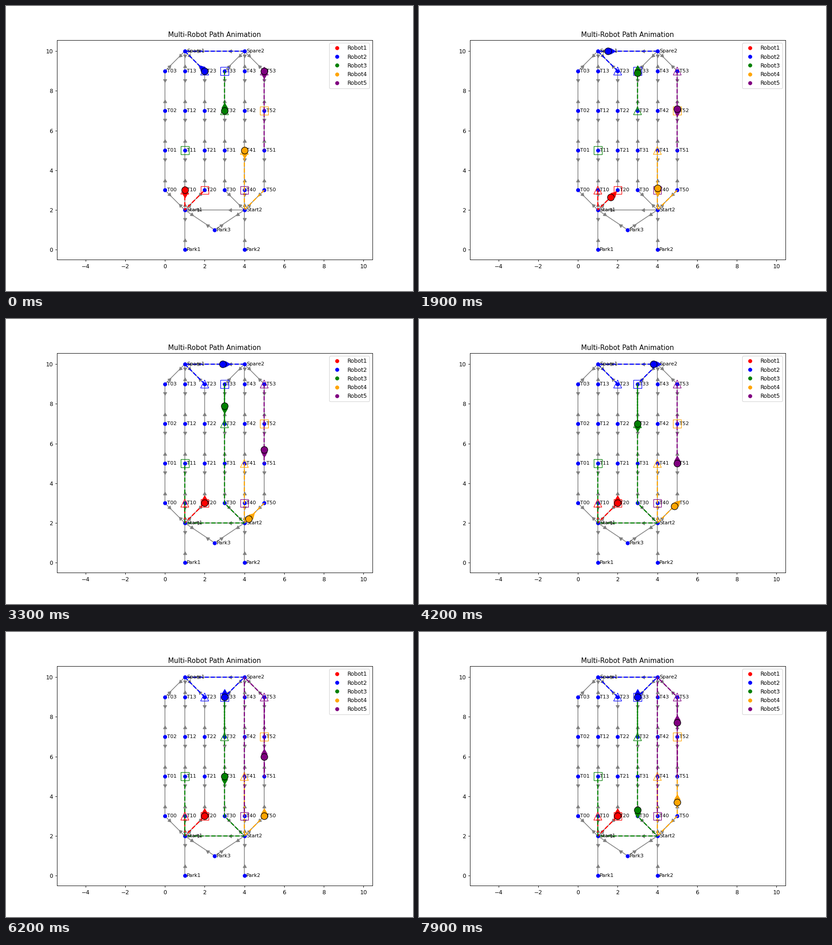
A matplotlib script for the animation above (8 s loop, 894 px wide and 626 px high).

```python
import numpy as np
import matplotlib.pyplot as plt
from matplotlib.animation import FuncAnimation

FRAMES, INTERVAL = 80, 100
DPI = 89.4
STEP = 0.1            # distance covered per frame
ARROW_GAP = 0.22      # heading arrow distance from the robot

# Track nodes: six columns with four stops each, plus junctions
nodes = {f"T{c}{r}": (c, 3 + 2 * r) for c in range(6) for r in range(4)}
nodes.update(Start1=(1, 2), Start2=(4, 2), Spare1=(1, 10), Spare2=(4, 10),
             Park1=(1, 0), Park2=(4, 0), Park3=(2.5, 1))

edges = [(f"T{c}{r}", f"T{c}{r + 1}") for c in range(6) for r in range(3)]
for c in range(6):
    side = 1 + c // 3
    edges += [(f"Start{side}", f"T{c}0"), (f"T{c}3", f"Spare{side}")]
edges += [("Start1", "Start2"), ("Spare1", "Spare2"), ("Park1", "Start1"),
          ("Park2", "Start2"), ("Park3", "Start1"), ("Park3", "Start2")]

# colour, start, goal, then (frame when planned, stops to append)
robots = [
    ("red", "T10", "T20", [(0, "Start1 T20")]),
    ("blue", "T23", "T33", [(0, "Spare1 Spare2"), (42, "T33")]),
    ("green", "T32", "T11", [(0, "T33"),
                             (22, "T32 T31 T30 Start2 Start1 T10 T11")]),
    ("orange", "T41", "T52", [(0, "T40 Start2 T50"), (72, "T51 T52")]),
    ("purple", "T53", "T40", [(0, "T52 T51"),
                              (52, "T52 T53 Spare2 T43 T42 T41 T40")]),
]


def triangle(d):
    """Triangle marker pointing along d."""
    return (3, 0, np.degrees(np.arctan2(d[1], d[0])) - 90)


def schedule(start, plans):
    """Timed legs: (planned at, departs, arrives, from, to)."""
    legs, clock, here = [], 0, np.array(nodes[start], float)
    for planned, stops in plans:
        clock = max(clock, planned)
        for stop in stops.split():
            there = np.array(nodes[stop], float)
            frames = int(round(np.hypot(*(there - here)) / STEP))
            legs.append((planned, clock, clock + frames, here, there))
            clock, here = clock + frames, there
    return legs


def pose(legs, t):
    """Position and unit heading; a waiting robot faces up."""
    pos = legs[0][3]
    for _, t0, t1, a, b in legs:
        if t0 <= t <= t1:
            d = b - a
            return a + d * (t - t0) / (t1 - t0), d / np.hypot(*d)
        if t > t1:
            pos = b
    return pos, np.array([0.0, 1.0])


fig, ax = plt.subplots(figsize=(894 / DPI, 626 / DPI), dpi=DPI)
ax.set_title("Multi-Robot Path Animation")

for a, b in edges:
    p, q = np.array(nodes[a], float), np.array(nodes[b], float)
    ax.plot(*zip(p, q), color="gray", lw=1.3, zorder=1, snap=False)
    for u, v in ((p, q), (q, p)):
        ax.plot(*(u + 0.23 * (v - u)), marker=triangle(v - u), ms=7,
                color="gray", zorder=1)

for name, (x, y) in nodes.items():
    ax.plot(x, y, "o", color="blue", ms=6, zorder=1.5)
    ax.text(x + 0.1, y, name, fontsize=9, va="center")

team = []
for i, (color, start, goal, plans) in enumerate(robots, 1):
    for spot, shape in ((start, "^"), (goal, "s")):
        ax.scatter(*nodes[spot], s=200, marker=shape, facecolors="none",
                   edgecolors=color, zorder=4)
    path, = ax.plot([], [], "--", color=color, lw=2, zorder=2)
    head, = ax.plot([], [], color=color, ms=12, ls="none", zorder=5)
    body, = ax.plot([], [], "o", mfc=color, mec="black", ms=12, zorder=6)
    ax.plot([], [], "o", color=color, ls="none", label=f"Robot{i}")
    team.append((schedule(start, plans), path, head, body))

ax.legend(loc="upper right")
ax.set_aspect("equal", adjustable="datalim")
ax.set_ylim(-0.5025, 10.5525)
half = 0.5 * 11.055 * (0.775 * 894) / (0.77 * 626)
ax.set_xlim(2.5 - half, 2.5 + half)


def update(t):
    artists = []
    for legs, path, head, body in team:
        route = [legs[0][3]] + [leg[4] for leg in legs if leg[0] <= t]
        path.set_data(*zip(*route))
        pos, d = pose(legs, t)
        tip = pos + ARROW_GAP * d
        body.set_data([pos[0]], [pos[1]])
        head.set_data([tip[0]], [tip[1]])
        head.set_marker(triangle(d))
        artists += [path, head, body]
    return artists


anim = FuncAnimation(fig, update, frames=FRAMES, interval=INTERVAL,
                     repeat=True, repeat_delay=0, blit=False)
plt.show()
```
